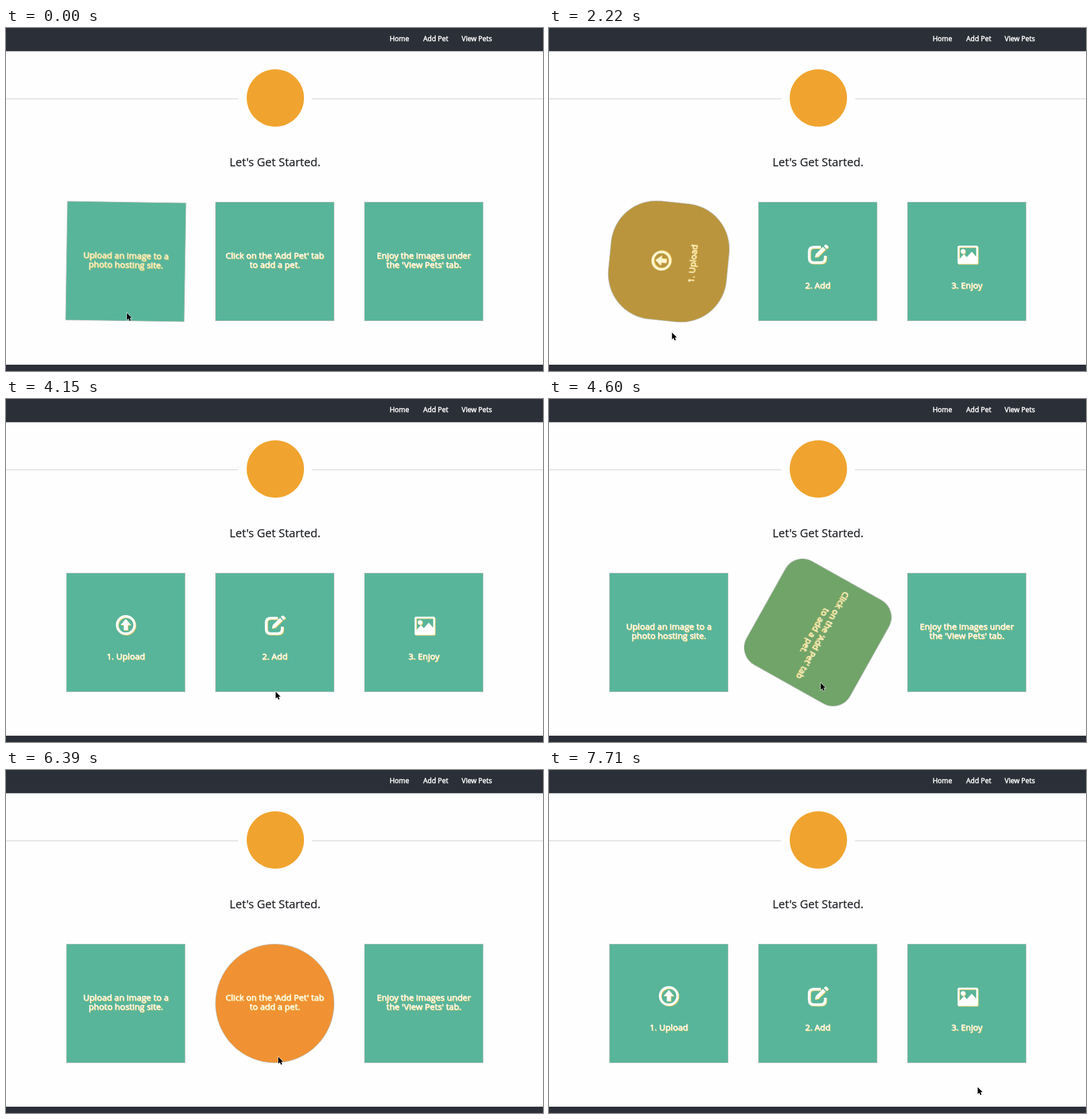
Animation, 937 px wide and 598 px high, one loop 8000 ms. Source, as an HTML page:

```html
<!DOCTYPE html>
<html lang="en">
<head>
<meta charset="utf-8">
<title>Let's Get Started</title>
<style>
  html, body { margin: 0; width: 100%; height: 100%; overflow: hidden; background: #fefefe; }
  svg { display: block; font-family: "Open Sans", sans-serif; }
  .bar { fill: #2b2f37; }
  .nav { font-size: 12px; fill: #fff; stroke: #fff; stroke-width: .55; }
  .heading { font-size: 20px; fill: #1f2126; stroke: #1f2126; stroke-width: .25; text-anchor: middle; }
  .face { --ink: #fff; font-size: 15px; text-anchor: middle; fill: var(--ink); filter: drop-shadow(1px 1px 0 #f3cf62); }
  .face text { stroke: var(--ink); stroke-width: .4; }
  .turning .face { --ink: #fdf6d2; }
  .line { fill: none; stroke: var(--ink); }
  .box { stroke: #bfc5c2; }
</style>
</head>
<body>
<svg width="937" height="598" viewBox="0 0 937 598">
  <rect class="bar" width="937" height="40.5"/>
  <rect class="bar" y="587" width="937" height="11"/>
  <g class="nav">
    <text x="669.5" y="23">Home</text>
    <text x="728" y="23">Add Pet</text>
    <text x="795" y="23">View Pets</text>
  </g>
  <path d="M0 123.5H405M534 123.5H937" stroke="#ccc"/>
  <circle cx="470" cy="122" r="50" fill="#f0a42f"/>
  <text class="heading" x="469.5" y="241">Let's Get Started.</text>
  <g id="tiles"></g>
  <path id="cursor" d="M0 0V12L2.8 9.4L4.7 13.8L6.8 12.9L5 8.6H8.6Z" stroke="#fff" stroke-width="1.2" paint-order="stroke"/>
</svg>
<script>
const LOOP = 8000, STEPS = 54, STEP = LOOP / STEPS;   // each picture is held for one step
const TURN = 980, RETURN = 558;

// enter and leave: when the pointer goes over a tile; rest: when the tile is square again
const tiles = [
  { x: 209, label: "1. Upload", lines: ["Upload an image to a", "photo hosting site."],
    icon: `<circle class="line" cy="-13" r="15.2" stroke-width="4.2"/>
      <path d="M0 -23.5L9 -13H3.5V-4H-3.5V-13H-9Z"/>`,
    enter: -35, leave: 2070, rest: 2660 },
  { x: 469, label: "2. Add", lines: ["Click on the 'Add Pet' tab", "to add a pet."],
    icon: `<path class="line" stroke-width="4.6" d="M5 -25H-7Q-15 -25 -15 -17V-6Q-15 2 -7 2H5Q13 2 13 -6V-10"/>
      <path d="M-5 -7L-3.5 -13L9 -25.5L13.5 -21L1 -8.5ZM10.5 -27L13 -29.3Q14.5 -30 16 -28.5L18 -26.5Q19 -25 18 -24L15 -22Z"/>`,
    enter: 4201, leave: 6515, rest: 7105 },
  { x: 729, label: "3. Enjoy", lines: ["Enjoy the images under", "the 'View Pets' tab."],
    icon: `<rect class="line" x="-14.5" y="-26" width="32.5" height="29" rx="1" stroke-width="3.2"/>
      <circle cx="-6.5" cy="-17.5" r="4"/>
      <path d="M-13 2V-4L-5 -13L0 -7.5L8.5 -17L17 -7.5V2Z"/>` }
];

// the pointer goes straight to each place, with a bow up or down on the way
const home = { x: 211, y: 497 };
const moves = [
  { from: 1926, to: 2667, x: 220, y: 551, bow: 13 },
  { from: 2780, to: 3408, x: 467, y: 554, bow: -8 },
  { from: 3700, to: 4590, x: 474, y: 495, bow: -14 },
  { from: 4600, to: 4800, x: 475, y: 500, bow: 0 },
  { from: 6370, to: 7704, x: 748, y: 553, bow: 25 }
];

const clamp = v => Math.min(1, Math.max(0, v));
const mix = (a, b, k) => a + (b - a) * k;

// cubic-bezier(.42, 0, .58, 1), solved for its parameter by bisection
function easeInOut(x) {
  let low = 0, high = 1;
  while (high - low > 1e-6) {
    const s = (low + high) / 2;
    const guess = 1.26 * s * (1 - s) ** 2 + 1.74 * s * s * (1 - s) + s ** 3;
    if (guess < x) low = s; else high = s;
  }
  return x >= 1 ? 1 : low * low * (3 - 2 * low);
}

const isOver = ({ enter, leave }, t) => t >= enter && t < leave;

function progress(tile, t) {
  if (isOver(tile, t)) return easeInOut((t - tile.enter) / TURN);
  return t >= tile.leave ? clamp((tile.rest - t) / RETURN) ** 1.1 : 0;
}

// green to orange; red comes in late, green and blue fall early
function tint(p) {
  const late = p ** 1.65, early = 1 - (1 - p) ** 1.6;
  return `rgb(${mix(88, 240, late)} ${mix(181, 146, early)} ${mix(154, 51, early)})`;
}

function pointerAt(t) {
  let { x, y } = home;
  for (const move of moves) {
    const k = clamp((t - move.from) / (move.to - move.from));
    x = mix(x, move.x, k);
    y = mix(y, move.y, k) + move.bow * Math.sin(Math.PI * k);
  }
  return [x, y];
}

const cursor = document.getElementById("cursor");
const holder = document.getElementById("tiles");
holder.innerHTML = tiles.map(({ label, lines, icon }) => `<g>
  <rect class="box" x="-103.5" y="-103.5" width="207" height="207"/>
  <g class="face">${icon}<text y="46.5">${label}</text></g>
  <g class="face"><text y="-5">${lines[0]}</text><text y="11">${lines[1]}</text></g>
</g>`).join("");
tiles.forEach((tile, i) => {
  tile.group = holder.children[i];
  [tile.box, tile.front, tile.back] = tile.group.children;
});

function draw(now) {
  const t = Math.floor((now % LOOP + 5) / STEP) % STEPS * STEP;
  const hovered = tiles.some(tile => isOver(tile, t));
  for (const tile of tiles) {
    const p = progress(tile, t);
    tile.group.setAttribute("transform", `translate(${tile.x} 407) rotate(${360 * p})`);
    tile.group.classList.toggle("turning", p > 0 && p < 1);
    tile.box.setAttribute("rx", 103.5 * p);
    tile.box.setAttribute("fill", tint(p));
    tile.front.style.display = hovered ? "none" : "";
    tile.back.style.display = hovered ? "" : "none";
  }
  cursor.setAttribute("transform", `translate(${pointerAt(t)})`);
}

const start = performance.now();
(function tick() {
  draw(performance.now() - start);
  requestAnimationFrame(tick);
})();
</script>
</body>
</html>
```
